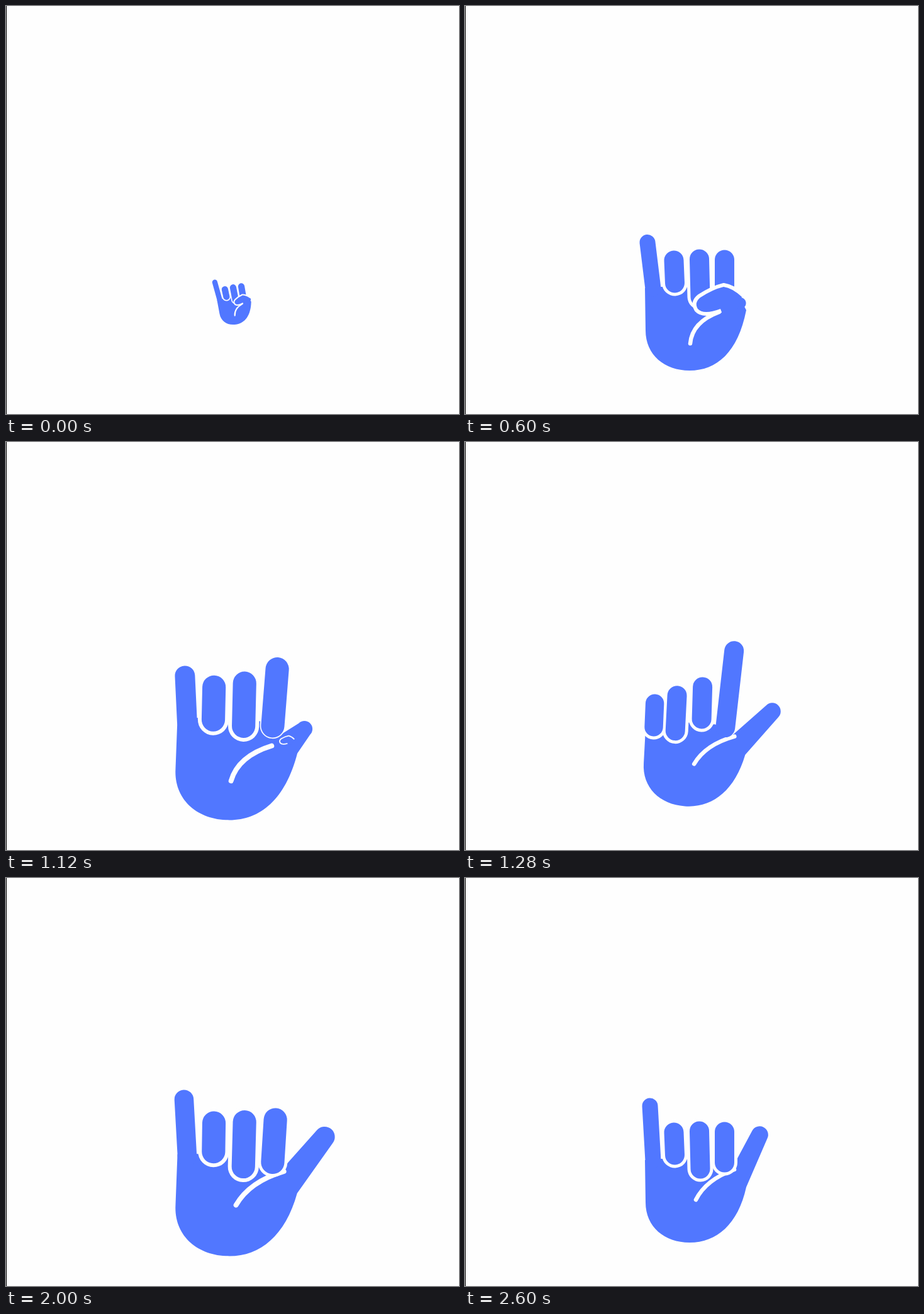
An HTML page with a canvas for the animation above (2.64 s loop, 720 px wide and 648 px high).

```html
<!DOCTYPE html>
<html lang="en">
<head>
<meta charset="utf-8">
<title>Hand signs</title>
<style>
  html, body { margin: 0; width: 100%; height: 100%; overflow: hidden; background: #fefefe; }
  canvas { display: block; }
</style>
</head>
<body>
<canvas id="stage" width="720" height="648"></canvas>
<script>
const ctx = document.getElementById('stage').getContext('2d');
const LOOP = 2640, BLUE = '#5177ff', WHITE = '#fefefe';
const CENTER = { x: 361, y: 470 };
const BEATS = [200, 1120, 2000]; // I, L, Y

// Each pair holds the value for I and Y, then for L.
const FINGERS = [
  { x: 299, root: [449, 457], tip: [375.5, 419.5], lean: [-9, -1] },
  { x: 333.5, root: [440, 460.5], tip: [404, 404.5], lean: [-1.5, -1] },
  { x: 374, root: [462, 439], tip: [402, 388], lean: [-1.5, -2] },
  { x: 412.5, root: [452, 450], tip: [403, 327.5], lean: [0, 5.5] }
];

const lerp = (a, b, k) => a + (b - a) * k;
const ramp = (t, from, to) => {
  const k = Math.min(1, Math.max(0, (t - from) / (to - from)));
  return k * k * (3 - 2 * k);
};
// Rises to 1 at the peak and falls back to 0.
const bump = (t, start, peak, end) => ramp(t, start, peak) - ramp(t, peak, end);
const onBeats = (t, start, peak, end) =>
  BEATS.reduce((sum, beat) => sum + bump(t - beat, start, peak, end), 0);

function stroke(color, width) {
  ctx.lineCap = 'round';
  ctx.lineWidth = width;
  ctx.strokeStyle = color;
  ctx.stroke();
}

function fingersAt(t) {
  const toL = bump(t, 1040, 1240, 1840) && ramp(t, 1040, 1240) - ramp(t, 1840, 2040);
  const k = t < 1840 ? ramp(t, 1040, 1240) : 1 - ramp(t, 1840, 2040);
  const fingers = FINGERS.map(({ x, root, tip, lean }) => ({
    x, y: lerp(...root, k), tipX: x + lerp(...lean, k), tipY: lerp(...tip, k), r: 15.5, open: 0
  }));
  const pinky = fingers[0], index = fingers[3];
  pinky.open = 1 - k;
  pinky.r = lerp(12.5, 14.7, k);
  pinky.tipX += 4 * ramp(t, 2280, 2460);
  pinky.tipY -= 14 * (1 - ramp(t, 260, 520)) + 13.5 * ramp(t, 1920, 2120);
  index.open = k;
  return fingers;
}

function drawFinger(f, color, border = 0) {
  ctx.beginPath();
  ctx.moveTo(f.tipX, f.tipY);
  ctx.lineTo(f.x, f.y);
  stroke(color, 2 * (f.r + border));
}

function drawPalm(thumbOut, toY) {
  const angle = lerp(-.84, -1.11, toY), length = lerp(4, 75, thumbOut);
  ctx.beginPath();
  ctx.moveTo(286, 448);
  ctx.lineTo(287, 515);
  ctx.bezierCurveTo(287, 554, 317, 579, 357, 579);
  ctx.bezierCurveTo(400, 579, 434, 550, 447, lerp(483, 491, thumbOut));
  ctx.arc(435 + length * Math.cos(angle), 475 + length * Math.sin(angle), lerp(9, 13.5, thumbOut),
    angle + Math.PI / 2, angle - Math.PI / 2, true);
  ctx.lineTo(424, 462);
  ctx.lineTo(396, 446);
  ctx.lineTo(310, 446);
  ctx.fillStyle = BLUE;
  ctx.fill();
}

function drawCrease(k) {
  ctx.beginPath();
  ctx.moveTo(lerp(404, 428, k), lerp(486, 463, k));
  ctx.quadraticCurveTo(lerp(361, 383, k), lerp(502, 479, k), lerp(358, 367, k), lerp(536, 511, k));
  stroke(WHITE, 6.5);
}

function drawFoldedThumb(size) {
  if (size < .02) return;
  ctx.save();
  ctx.translate(442, 470);
  ctx.scale(size, size);
  ctx.translate(-442, -470);
  ctx.beginPath();
  ctx.moveTo(440, 462);
  ctx.quadraticCurveTo(425, 448, 411, 446);
  ctx.quadraticCurveTo(394, 450, 374, 463);
  ctx.quadraticCurveTo(364, 471, 370, 481);
  ctx.quadraticCurveTo(379, 491, 406, 481);
  ctx.lineCap = 'butt';
  ctx.lineWidth = 12;
  ctx.strokeStyle = WHITE;
  ctx.stroke();
  ctx.lineTo(430, 490);
  ctx.fillStyle = BLUE;
  ctx.fill();
  ctx.restore();
}

function draw(t) {
  const size = lerp(.33, 1, ramp(t, 0, 200)) + .2 * onBeats(t, -160, 0, 160);
  const tilt = -.17 * (1 - ramp(t, 0, 230)) + .085 * onBeats(t, -160, 115, 280);
  const thumbOut = ramp(t, 1040, 1240);
  const fingers = fingersAt(t);

  ctx.fillStyle = WHITE;
  ctx.fillRect(0, 0, 720, 648);
  ctx.save();
  ctx.translate(CENTER.x, CENTER.y);
  ctx.rotate(tilt);
  ctx.scale(size, size);
  ctx.translate(-CENTER.x, -CENTER.y);

  drawPalm(thumbOut, ramp(t, 1920, 2120));
  for (const f of fingers) if (f.open < .5) drawFinger(f, WHITE, 5 * (1 - 2 * f.open));
  drawCrease(thumbOut);
  for (const f of fingers) drawFinger(f, BLUE);
  drawFoldedThumb(1 - ramp(t, 1040, 1160));
  ctx.restore();

  ctx.fillStyle = '#000';
  ctx.fillRect(0, 0, 1, 648);
}

function frame() {
  draw(performance.now() % LOOP);
  requestAnimationFrame(frame);
}
frame();
</script>
</body>
</html>
```
